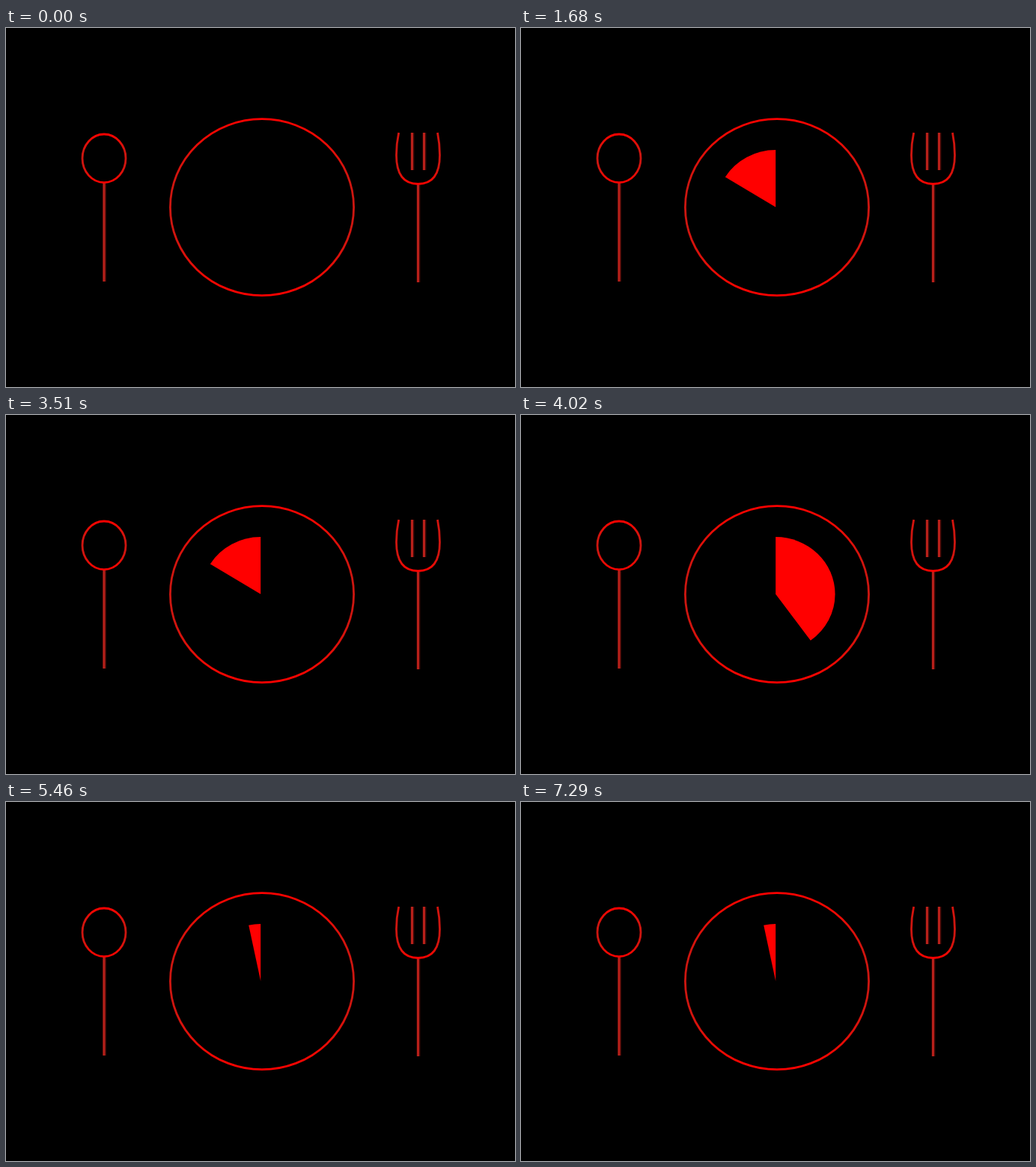
Recreate the animation shown at these times as an HTML page with a canvas. Size 680 by 480 pixels, loop 7320 ms.

```html
<!DOCTYPE html>
<html>
<head>
<meta charset="utf-8">
<style>
html, body { margin: 0; width: 100%; height: 100%; overflow: hidden; background: #000; }
canvas { display: block; }
</style>
</head>
<body>
<canvas id="stage" width="680" height="480"></canvas>
<script>
const ctx = document.getElementById('stage').getContext('2d');
const TAU = Math.PI * 2;
const STEP = 30, FILL = 30, CLEAR = 31;

// Outlines are a little darker where they run vertically.
function outline(x, halfWidth, draw) {
  const shade = ctx.createLinearGradient(x - halfWidth, 0, x + halfWidth, 0);
  shade.addColorStop(0, '#cc1610');
  shade.addColorStop(0.2, '#f00802');
  shade.addColorStop(0.5, '#ff0000');
  shade.addColorStop(0.8, '#f00802');
  shade.addColorStop(1, '#cc1610');
  ctx.strokeStyle = shade;
  ctx.lineWidth = 2.8;
  ctx.beginPath();
  draw();
  ctx.stroke();
}

function oval(x, y, rx, ry) {
  outline(x, rx, () => ctx.ellipse(x, y, rx, ry, 0, 0, TAU));
}

function bar(x, top, bottom) {
  ctx.fillStyle = '#3c0806';
  ctx.fillRect(x - 2, top, 5, bottom - top);
  ctx.fillStyle = '#b8201a';
  ctx.fillRect(x - 1.5, top, 3, bottom - top);
}

function drawTable() {
  oval(342, 239.7, 122.6, 118);

  bar(131, 207, 339);
  oval(131, 174.3, 29, 32.3);

  bar(550.5, 209, 340);
  bar(542.5, 140, 190);
  bar(558.5, 140, 190);
  outline(550.5, 29, () => {
    ctx.moveTo(524.7, 140);
    ctx.bezierCurveTo(522.5, 150, 521.5, 160, 521.5, 170);
    ctx.bezierCurveTo(521.5, 195, 531, 208.5, 550.5, 208.5);
    ctx.bezierCurveTo(570, 208.5, 579.5, 195, 579.5, 170);
    ctx.bezierCurveTo(579.5, 160, 578.5, 150, 576.5, 140);
  });
}

// Fills the share of the disc between two turns, clockwise from the top.
function drawPie(from, to) {
  if (to <= from) return;
  const x = 340.2, y = 239.6;
  ctx.fillStyle = '#ff0000';
  ctx.beginPath();
  ctx.moveTo(x, y);
  ctx.ellipse(x, y, 79.4, 76.5, 0, (from - 0.25) * TAU, (to - 0.25) * TAU);
  ctx.fill();
}

const start = performance.now();

function render() {
  const elapsed = Math.max(0, performance.now() - start);
  const step = Math.floor(elapsed / STEP) % (FILL + CLEAR);
  ctx.fillStyle = '#000';
  ctx.fillRect(0, 0, 680, 480);
  drawTable();
  drawPie(Math.max(0, (step - FILL) / CLEAR), Math.min(1, step / FILL));
  requestAnimationFrame(render);
}
render();
</script>
</body>
</html>
```
